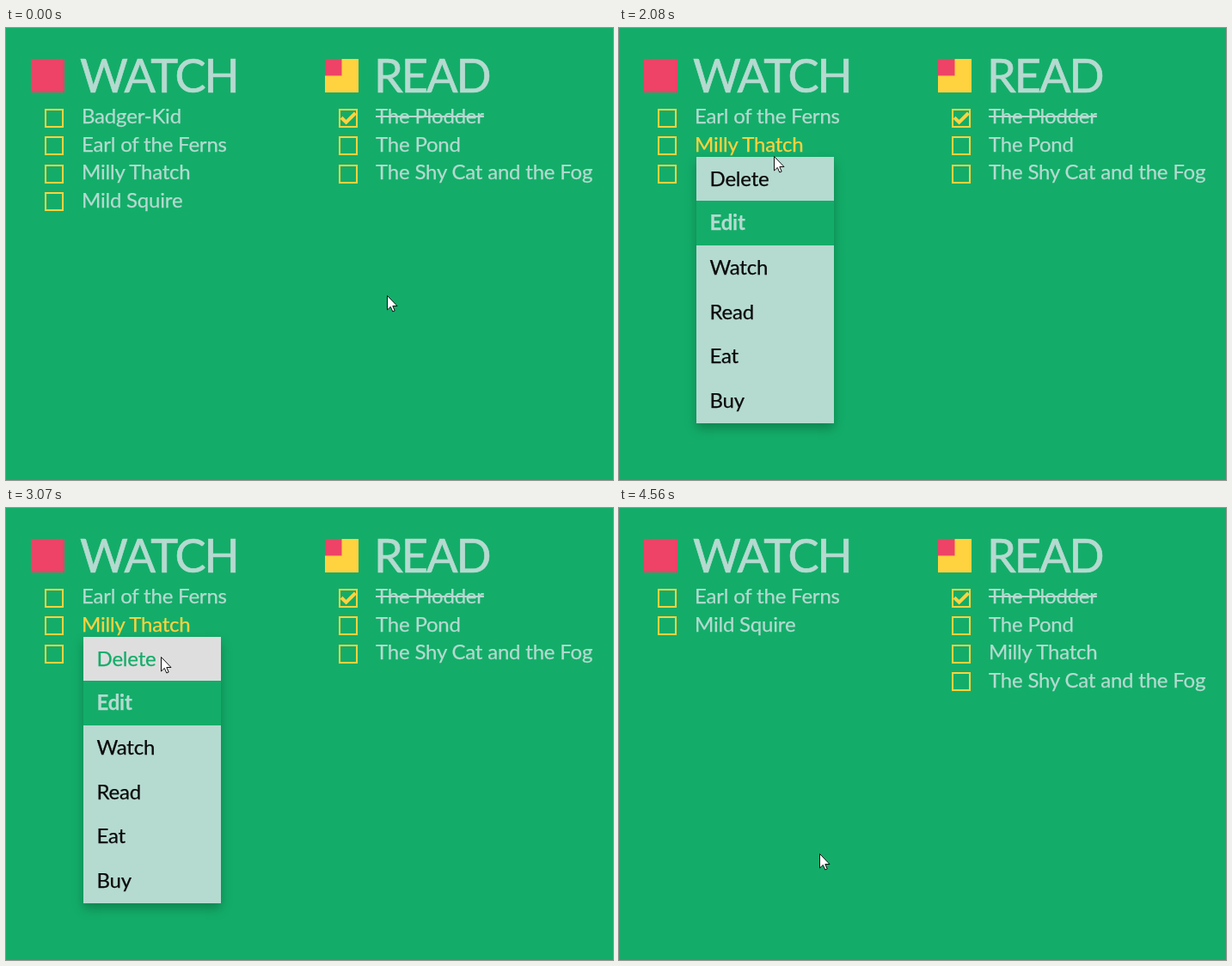
An HTML page for the animation above (4.59 s loop, 706 by 526 pixels).

```html
<!DOCTYPE html>
<html lang="en">
<head>
<meta charset="utf-8">
<title>Watch and read lists</title>
<style>
  :root { --green: #13ad69; --pale: #b5dad0; --yellow: #ffd23f; --red: #ee4266; }
  html, body { margin: 0; width: 100%; height: 100%; overflow: hidden; background: var(--green); }
  body { font: 24px Lato, Cabin, sans-serif; letter-spacing: -.2px; color: var(--pale);
         -webkit-text-stroke: .25px currentColor; cursor: default; }
  #stage { position: absolute; left: 0; top: 0; width: 706px; height: 526px; overflow: hidden; }
  #stage div, #stage svg { position: absolute; white-space: nowrap; }
  svg { left: 0; top: 0; overflow: visible; }
  .col { top: 0; }
  .mark { left: 0; top: 36px; width: 39px; height: 39px; background: var(--red); }
  .mark.split { background: linear-gradient(var(--red), var(--red)) 0 0 / 19.5px 19.5px no-repeat var(--yellow); }
  .title { left: 57px; top: 22.5px; font-size: 54px; line-height: 64px; letter-spacing: -2px; -webkit-text-stroke-width: .7px; }
  .row { left: 0; height: 32.4px; line-height: 32.4px; }
  .box { left: 16px; top: 7.6px; width: 18px; height: 18px; border: 2px solid var(--yellow); }
  .label { left: 59px; top: 0; }
  .done .label { text-decoration: line-through 2px; }
  .hot .label { color: var(--yellow); }
  #menu { left: 90px; width: 160px; height: 310px; background: var(--pale); color: #0a0a0a;
          box-shadow: 0 6px 12px rgba(0, 0, 0, .25); }
  #menu div { left: 0; width: 144.5px; height: 51.67px; padding-left: 15.5px; line-height: 50px; }
  #menu .bold { background: var(--green); color: var(--pale); font-weight: bold; }
  #menu .over { background: #dedede; color: var(--green); }
  #ring { left: -12px; top: -12px; width: 24px; height: 24px; border-radius: 50%; background: rgba(255, 255, 0, .45); }
  #pointer { left: 0; top: 0; }
</style>
</head>
<body>
<div id="stage">
  <div class="col" style="left:29px">
    <div class="mark"></div><div class="title">WATCH</div><div id="watch"></div>
  </div>
  <div class="col" style="left:371px">
    <div class="mark split"></div><div class="title">READ</div><div id="read"></div>
  </div>
  <div id="menu"></div>
  <div id="pointer">
    <div id="ring"></div>
    <svg width="13" height="20"><path d="M.5.5V17L4.3 13.4 6.8 19 9.2 18 6.8 12.5H12Z" fill="#fff" stroke="#111" stroke-linejoin="round"/></svg>
  </div>
</div>
<script>
const LOOP = 4590, ROW = 32.4, ITEM = 51.67, MENU_TOP = 117.2, PRESS = 100;
const DELETED = 1650, MOVED = 3950;
const $ = id => document.getElementById(id);

const home = [443, 311];
// Eased pointer moves; "via" bends the way
const moves = [
  { from: 30, until: 530, via: [330, 140], to: [190, 107] },
  { from: 1080, until: 1270, to: [180, 149] },
  { from: 2080, until: 2290, via: [240, 101], to: [251, 157] },
  { from: 2290, until: 2410, to: [197, 166] },
  { from: 2410, until: 2580, via: [184, 140], to: [177, 150] },
  { from: 2600, until: 2640, to: [177, 142] },
  { from: 2920, until: 3500, via: [190, 235], to: [169, 327] },
  { from: 4380, until: 4560, to: [233, 402] }
];
// Row that holds the open menu
const hovers = [
  { at: 0, row: -1 }, { at: 360, row: 1 }, { at: 440, row: 0 }, { at: DELETED, row: 1 },
  { at: 2280, row: 2 }, { at: 2500, row: 1 }, { at: MOVED, row: -1 }
];
const clicks = [790, 1550, 3850];

const films = ["Badger-Kid", "Earl of the Ferns", "Milly Thatch", "Mild Squire"];
const books = ["The Plodder", "The Pond", "The Shy Cat and the Fog"];
const actions = ["Delete", "Edit", "Watch", "Read", "Eat", "Buy"];
const tick = '<svg width="18" height="18"><path d="M1 8.2 6.6 13.6 17.4 3" fill="none" stroke="#ffd23f" stroke-width="4"/></svg>';

const ease = k => k * k * (3 - 2 * k);
const mix = (a, b, k) => a + (b - a) * k;

function pointerAt(t) {
  let pos = home;
  for (const { from, until, via, to } of moves) {
    if (t < from) break;
    const k = ease(Math.min(1, (t - from) / (until - from)));
    pos = pos.map((p, i) => via
      ? mix(mix(p, via[i], k), mix(via[i], to[i], k), k)
      : mix(p, to[i], k));
  }
  return pos.map(Math.round);
}

const rows = (names, hot, done) => names.map((name, i) =>
  `<div class="row${i === hot ? " hot" : ""}${i === done ? " done" : ""}" style="top:${86.4 + i * ROW}px">` +
  `<div class="box">${i === done ? tick : ""}</div><div class="label">${name}</div></div>`).join("");

let last = "";
function drawLists(deleted, moved, row, over) {
  const key = [deleted, moved, row, over].join();
  if (key === last) return;
  last = key;
  const left = films.slice(deleted ? 1 : 0);
  const right = books.slice();
  if (moved) right.splice(2, 0, ...left.splice(1, 1));
  $("watch").innerHTML = rows(left, row, -1);
  $("read").innerHTML = rows(right, -1, 0);
  $("menu").style.display = row < 0 ? "none" : "block";
  $("menu").style.top = MENU_TOP + row * ROW + "px";
  $("menu").innerHTML = actions.map((name, i) =>
    `<div class="${i === 1 ? "bold" : i === over ? "over" : ""}" style="top:${i * ITEM}px">${name}</div>`).join("");
}

function draw(t) {
  const [x, y] = pointerAt(t);
  const { row } = hovers.filter(h => h.at <= t).pop();
  const inside = row >= 0 && x >= 90 && x < 250;
  const over = inside ? Math.max(-1, Math.floor((y - MENU_TOP - row * ROW) / ITEM)) : -1;
  drawLists(t >= DELETED, t >= MOVED, row, over);
  $("pointer").style.transform = `translate(${x}px, ${y}px)`;
  $("ring").style.display = clicks.some(c => t >= c && t < c + PRESS) ? "block" : "none";
}

const start = performance.now();
function frame() {
  draw((performance.now() - start) % LOOP);
  requestAnimationFrame(frame);
}
frame();
</script>
</body>
</html>
```
